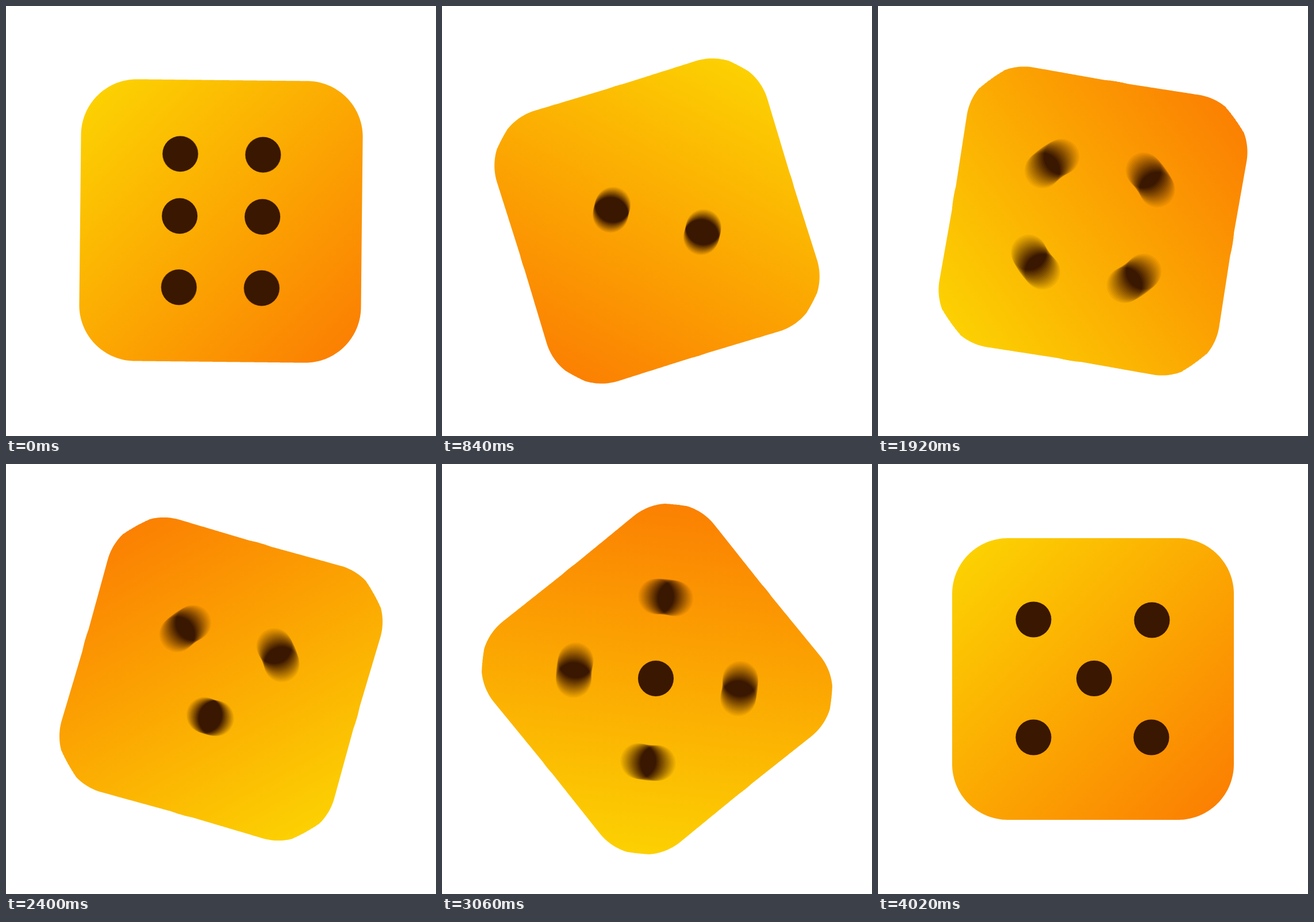
Animation, 748 px wide and 748 px high, one loop 4440 ms. Source, as an HTML page with a canvas:

```html
<!DOCTYPE html>
<html lang="en">
<head>
<meta charset="utf-8">
<title>Rolling die</title>
<style>
  html, body { margin: 0; width: 100%; height: 100%; overflow: hidden; background: #fff; }
  canvas { display: block; width: 748px; height: 748px; }
</style>
</head>
<body>
<canvas id="stage" width="748" height="748"></canvas>
<script>
const SIZE = 748, MID = SIZE / 2;
const LOOP = 4440, STEP = 60, STEPS = 67;
const TURN = Math.PI * 20;           // ten full turns per roll
const SAMPLES = 16, SHUTTER = 0.25;  // motion blur, shutter in steps
const HALF = 245, CORNER = 97, PIP = 31;

const faces = [
  { from: 0, pips: [[-72, -116], [72, -116], [-72, -8], [72, -8], [-72, 116], [72, 116]] },
  { from: 7, pips: [[-42, 70], [42, -70]] },
  { from: 20, pips: [[-88, -88], [88, -88], [-88, 88], [88, 88]] },
  { from: 34, pips: [[0, -69], [-85, 68], [85, 68]] },
  { from: 47, pips: [[-103.5, -103.5], [102.5, -102.5], [-103.5, 101.5], [101.5, 101.5], [2, -1]] }
];

const ctx = document.getElementById('stage').getContext('2d');
const layer = document.createElement('canvas');
layer.width = layer.height = SIZE;
const ink = layer.getContext('2d');

const gradient = ctx.createLinearGradient(-HALF, -HALF, HALF, HALF);
gradient.addColorStop(0, '#fcd602');
gradient.addColorStop(1, '#fb7b02');

function angleAt(step) {
  const u = Math.min(1, Math.max(0, (step + 0.5) / STEPS));
  return TURN * u * u * (3 - 2 * u);
}

// Distance from the centre to the edge of the rounded square.
function edge(phi) {
  const quarter = Math.PI / 2;
  let a = ((phi % quarter) + quarter) % quarter;
  a = Math.min(a, quarter - a);
  const c = HALF - CORNER;
  if (HALF * Math.tan(a) <= c) return HALF / Math.cos(a);
  const q = c * Math.SQRT2, d = Math.PI / 4 - a;
  return q * Math.cos(d) + Math.sqrt(CORNER ** 2 - (q * Math.sin(d)) ** 2);
}

// The body keeps a hard edge where half of the blur samples cover it.
function drawBody(angle, angles) {
  const points = 720;
  ctx.save();
  ctx.translate(MID, MID);
  ctx.rotate(angle);
  ctx.beginPath();
  for (let i = 0; i < points; i++) {
    const phi = i / points * Math.PI * 2;
    const r = angles.map(a => edge(phi - a + angle)).sort((a, b) => b - a)[SAMPLES / 2 - 1];
    ctx.lineTo(r * Math.cos(phi), r * Math.sin(phi));
  }
  ctx.closePath();
  ctx.fillStyle = gradient;
  ctx.fill();
  ctx.restore();
}

function drawPips(pips, angles) {
  ink.globalCompositeOperation = 'source-over';
  ink.globalAlpha = 1;
  ink.clearRect(0, 0, SIZE, SIZE);
  ink.globalCompositeOperation = 'lighter';
  ink.globalAlpha = 16 / 255;
  ink.fillStyle = '#fff';
  for (const a of angles) {
    const cos = Math.cos(a), sin = Math.sin(a);
    for (const [x, y] of pips) {
      ink.beginPath();
      ink.arc(MID + x * cos - y * sin, MID + x * sin + y * cos, PIP, 0, Math.PI * 2);
      ink.fill();
    }
  }
  ink.globalCompositeOperation = 'source-in';
  ink.globalAlpha = 1;
  ink.fillStyle = '#3a1700';
  ink.fillRect(0, 0, SIZE, SIZE);
  ctx.drawImage(layer, 0, 0);
}

function draw(step) {
  const angles = Array.from({ length: SAMPLES }, (_, i) =>
    angleAt(step + ((i + 0.5) / SAMPLES - 0.5) * SHUTTER));
  const face = faces.filter(f => f.from <= step).pop();
  ctx.fillStyle = '#fff';
  ctx.fillRect(0, 0, SIZE, SIZE);
  drawBody(angleAt(step), angles);
  drawPips(face.pips, angles);
}

let shown = -1;
function tick() {
  const step = Math.min(STEPS, Math.floor(performance.now() % LOOP / STEP));
  if (step !== shown) draw(shown = step);
  requestAnimationFrame(tick);
}
tick();
</script>
</body>
</html>
```
